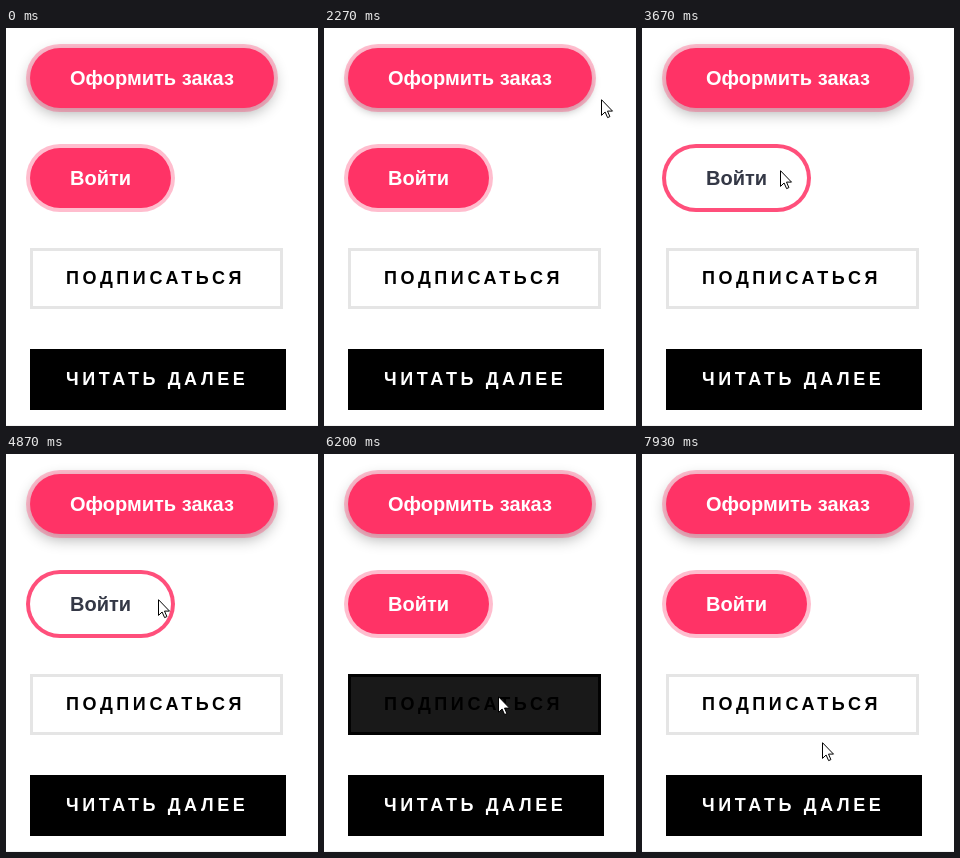
These frames come from a looping animation (312x398 px, 8000 ms). An HTML page:

```html
<!DOCTYPE html>
<html lang="ru">
<head>
<meta charset="utf-8">
<title>Кнопки</title>
<style>
  html, body { margin: 0; width: 100%; height: 100%; overflow: hidden; background: #fff; }
  body { position: relative; }
  .btn {
    position: absolute; left: 24px; box-sizing: border-box; white-space: nowrap;
    font: bold 20px/60px "Liberation Sans", Arial, sans-serif; color: #fff;
  }
  .pill { height: 60px; padding-left: 40px; border-radius: 30px; background: #ff3366; }
  .flat {
    height: 61px; padding-left: 33px; border: 3px solid #000; background: #000;
    font-size: 18px; line-height: 55px; letter-spacing: 3.6px;
  }
  #order { top: 20px; width: 244px; }
  #login { top: 120px; width: 141px; }
  #subscribe { top: 220px; width: 253px; }
  #more { top: 321px; width: 256px; }
  #edge { position: absolute; left: 0; top: 397px; width: 312px; height: 1px; background: #f3f3f3; }
  #cursor { position: absolute; left: 0; top: 0; }
</style>
</head>
<body>
<div id="order" class="btn pill">Оформить заказ</div>
<div id="login" class="btn pill">Войти</div>
<div id="subscribe" class="btn flat">ПОДПИСАТЬСЯ</div>
<div id="more" class="btn flat">ЧИТАТЬ ДАЛЕЕ</div>
<div id="edge"></div>
<svg id="cursor" width="13" height="20" viewBox="0 0 13 20">
  <path d="M.5 .7V16.4L4.1 13L6.6 18.6L8.9 17.6L6.5 12.1H11.5Z" fill="#fff" stroke="#000"/>
</svg>
<script>
const LOOP = 8000, FADE = 300;
const [order, login, subscribe, cursor] =
  ["order", "login", "subscribe", "cursor"].map(id => document.getElementById(id));

// Cursor moves: start, end, target x, target y
const moves = [
  [130, 930, 250, 63],
  [1730, 2530, 285, 73],
  [2600, 3600, 138, 142],
  [4600, 5330, 185, 151],
  [5470, 6250, 174, 243],
  [7270, 7730, 180, 288]
];

const clamp = v => Math.min(1, Math.max(0, v));
const mix = (a, b, p) => a + (b - a) * p;
const rgba = (a, b, p) => `rgba(${a.map((v, i) => mix(v, b[i], p)).join(",")})`;
const glide = u => (1 - Math.cos(Math.PI * clamp(u))) / 2;

// cubic-bezier(.25, .1, .25, 1)
function ease(x) {
  x = clamp(x);
  if (x === 0 || x === 1) return x;
  const curve = (a, b, s) => 3 * a * s * (1 - s) ** 2 + 3 * b * s * s * (1 - s) + s ** 3;
  let lo = 0, hi = 1;
  for (let i = 0; i < 24; i++) {
    const mid = (lo + hi) / 2;
    if (curve(0.25, 0.25, mid) < x) lo = mid; else hi = mid;
  }
  return curve(0.1, 1, lo);
}

const hover = (t, on, off) => ease((t - on) / FADE) - ease((t - off) / FADE);

function cursorAt(t) {
  let x = 313, y = 162;
  for (const [start, end, toX, toY] of moves) {
    const p = glide((t - start) / (end - start));
    x = mix(x, toX, p);
    y = mix(y, toY, p);
  }
  return [Math.round(x), Math.round(y)];
}

const PINK = [255, 51, 102, 1], WHITE = [255, 255, 255, 1], BLACK = [0, 0, 0, 1];
const RING = [255, 51, 102, 0.32];

function draw(t) {
  const a = hover(t, 690, 2220);
  order.style.boxShadow = `0 0 0 4px ${rgba(RING, RING, 0)}, ` +
    `0 ${mix(5, 4, a)}px ${mix(15, 6, a)}px ${rgba([0, 0, 0, 0.32], [0, 0, 0, 0.25], a)}`;

  const b = hover(t, 3330, 5000);
  login.style.background = rgba(PINK, WHITE, b);
  login.style.color = rgba(WHITE, [52, 56, 70, 1], b);
  login.style.boxShadow = `0 0 0 4px ${rgba(RING, [255, 51, 102, 0.86], b)}`;

  const c = hover(t, 6014, 7586);
  subscribe.style.background = rgba(WHITE, BLACK, c);
  subscribe.style.borderColor = rgba([0, 0, 0, 0.1], BLACK, c);
  // The label brightens only after the fill has gone dark
  subscribe.style.color = rgba(BLACK, WHITE, hover(t, 6265, 7586));

  const [x, y] = cursorAt(t);
  cursor.style.transform = `translate(${x}px, ${y}px)`;
}

const begin = performance.now();
function tick() {
  draw((performance.now() - begin) % LOOP);
  requestAnimationFrame(tick);
}
tick();
</script>
</body>
</html>
```
